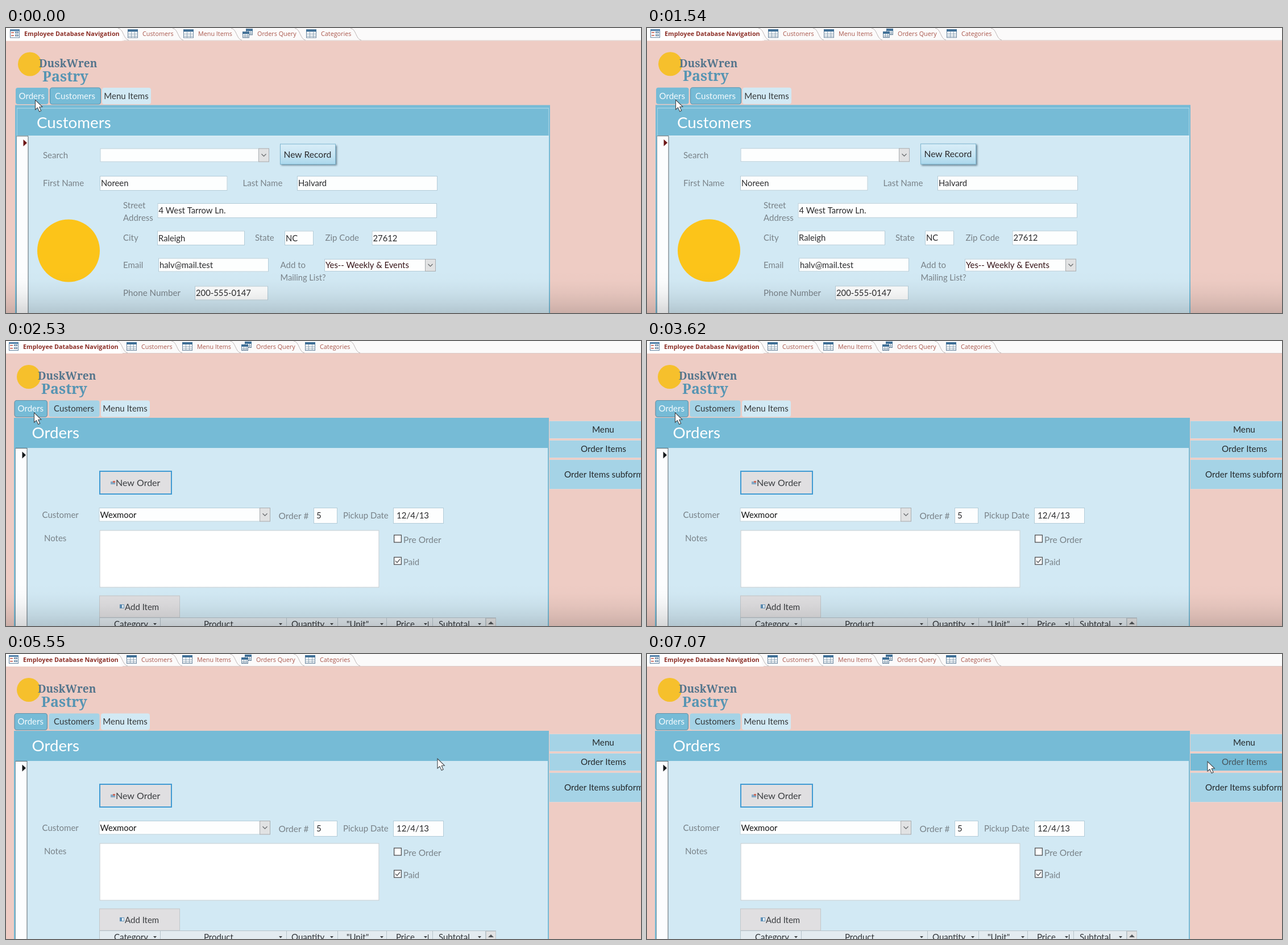
An HTML page with a canvas for the animation above (8 s loop, 1117 by 501 pixels).

```html
<!DOCTYPE html>
<html lang="en">
<head>
<meta charset="utf-8">
<title>Bakery database navigation</title>
<style>
html, body { margin: 0; width: 100%; height: 100%; overflow: hidden; background: #eeccc4; }
canvas { display: block; width: 1117px; height: 501px; }
</style>
</head>
<body>
<canvas id="stage" width="1117" height="501"></canvas>
<script>
const W = 1117, H = 501, LOOP = 8000;
const c = document.getElementById('stage').getContext('2d');
const FORM = 'Lato, "Open Sans", sans-serif';
const UI = '"Open Sans", "Noto Sans", sans-serif';
const SERIF = '"Noto Serif", serif';
const PINK = '#eeccc4', BLUE = '#76bbd6', SOFT = '#a5d3e6', PALE = '#d2e9f4';
const GREY = '#798288', INK = '#2a2a2c';

function rect(x, y, w, h, fill, stroke, lw = 1) {
  if (fill) { c.fillStyle = fill; c.fillRect(x, y, w, h); }
  if (stroke) {
    c.strokeStyle = stroke;
    c.lineWidth = lw;
    c.strokeRect(x + lw / 2, y + lw / 2, w - lw, h - lw);
  }
}

function path(points, fill, stroke, lw = 1, closed = true) {
  c.beginPath();
  points.forEach(([x, y], i) => i ? c.lineTo(x, y) : c.moveTo(x, y));
  if (closed) c.closePath();
  if (fill) { c.fillStyle = fill; c.fill(); }
  if (stroke) { c.strokeStyle = stroke; c.lineWidth = lw; c.stroke(); }
}

function disc(x, y, r, fill) {
  c.beginPath();
  c.arc(x, y, r, 0, Math.PI * 2);
  c.fillStyle = fill;
  c.fill();
}

// y is the middle of the capitals
function text(s, x, y, size = 15, fill = INK, family = FORM, weight = 400) {
  c.font = `${weight} ${size}px ${family}`;
  c.fillStyle = fill;
  c.fillText(s, x, y + size * 0.36);
}

const label = (s, x, y, size = 15) => text(s, x, y, size, GREY);

function field(x, y, w, h, value = '', fill = INK) {
  rect(x, y, w, h, '#fdfefe', '#b4ccd8');
  if (value) text(value, x + 2, y + h / 2, 14.8, fill);
}

function chevron(x, y) {
  path([[x - 4, y - 2], [x, y + 2], [x + 4, y - 2]], null, '#66696c', 1.2, false);
}

function combo(x, y, w, h, value, fill) {
  field(x, y, w, h, value, fill);
  rect(x + w - 19, y, 19, h, '#e1e2e3', '#a9adb0');
  chevron(x + w - 9.5, y + h / 2);
}

// Document tabs
function gridIcon(x, y, w = 18, h = 15) {
  rect(x, y, w, h, '#fff', '#64809a');
  rect(x, y, w, 4, '#3f6f96');
  for (let i = 1; i < 3; i++) {
    rect(x + i * w / 3, y + 4, 1, h - 4, '#8ba2b4');
    rect(x, y + 4 + i * (h - 4) / 3, w, 1, '#8ba2b4');
  }
}

function formIcon(x, y) {
  rect(x, y, 17, 15, '#fff', '#5f7f9c');
  rect(x, y, 17, 3, '#4f7fa8');
  for (const row of [5, 10]) {
    rect(x + 2, y + row, 5, 1.5, '#c0564a');
    rect(x + 9, y + row - 1, 6, 3, '#d5e5f1', '#5f7f9c');
  }
}

function queryIcon(x, y) {
  gridIcon(x + 6, y - 1, 12, 11);
  gridIcon(x, y + 4, 12, 11);
}

function docEdge(x) {
  c.beginPath();
  c.moveTo(x - 17, 0);
  c.bezierCurveTo(x - 7, 1, x - 8, 19, x + 2, 21);
  c.strokeStyle = '#bdb6b6';
  c.lineWidth = 1;
  c.stroke();
}

function docTabs() {
  rect(-4, -2, W + 8, 24, '#fbfafa');
  rect(-4, -2, 206, 24, '#fff');
  rect(205, 21, W, 1, '#dccbc8');
  formIcon(5, 2);
  text('Employee Database Navigation', 30, 10, 10.8, '#8c2f27', UI, 700);
  const tabs = [['Customers', 238, gridIcon], ['Menu Items', 336, gridIcon],
    ['Orders Query', 440, queryIcon], ['Categories', 552, gridIcon]];
  for (const [name, x, icon] of tabs) {
    icon(x - 26, 2);
    text(name, x, 10, 10.8, '#a9564b', UI);
  }
  [212, 308, 411, 523, 621].forEach(docEdge);
}

function brand() {
  disc(40, 63, 21, '#f6c02c');
  text('DuskWren', 56, 61.5, 19, '#54758c', SERIF, 600);
  text('Pastry', 62, 84, 25, '#5795b3', SERIF, 600);
}

function navTab(name, x, w, fill, ink, border) {
  c.beginPath();
  c.roundRect(x, 104.5, w, 29, 4);
  c.fillStyle = fill;
  c.fill();
  if (border) { c.strokeStyle = border; c.lineWidth = 1.2; c.stroke(); }
  c.textAlign = 'center';
  text(name, x + w / 2 - 0.5, 119, 15, ink);
  c.textAlign = 'left';
}

function navTabs(t) {
  const open = t >= 2530, hover = t >= 2220 && !open, focus = t >= 2450;
  navTab('Orders', 15, 57.5, hover ? '#9ecfe4' : BLUE, hover ? '#46535a' : '#f4fafd',
    focus ? '#6592a8' : null);
  navTab('Customers', 75.5, 89, open ? SOFT : BLUE, open ? '#34383a' : '#f4fafd',
    focus ? null : '#5797b3');
  navTab('Menu Items', 167, 86, PALE, '#34383a');
}

function panel(title, x, y, top, arrow) {
  rect(14, 135, 941, 370, BLUE);
  rect(17, top, 936, 320, PALE);
  rect(17, top, 20, 320, '#fcfdfe');
  rect(16, top, 1, 320, '#7f97a3');
  rect(36.5, top, 1, 320, '#59666d');
  rect(17, top, 20, 1, '#59666d');
  path([[28.5, top + 6.5], [35, top + 12.5], [28.5, top + 18.5]], arrow);
  text(title, x, y, 27.7, '#fff');
}

function customers(t) {
  panel('Customers', 52, 165.7, 189, t < 2220 ? '#6d1616' : '#380d0d');
  rect(17, 140, 936, 1, '#b9dfed');
  rect(17, 140, 1, 49, '#a4d3e5');
  rect(952, 140, 1, 49, '#a4d3e5');
  rect(37, 189, 916, 1, '#eaf5fa');

  label('Search', 63, 223);
  combo(163.5, 211, 297.5, 24, '');

  const glow = c.createLinearGradient(0, 203, 0, 240);
  glow.addColorStop(0, '#d9eef8');
  glow.addColorStop(0.5, '#c8e5f3');
  glow.addColorStop(1, '#a9d7ec');
  c.save();
  c.shadowColor = 'rgba(50,80,100,.65)';
  c.shadowBlur = 3;
  c.shadowOffsetX = c.shadowOffsetY = 2;
  rect(480, 203, 98, 36.5, glow);
  c.restore();
  rect(480, 203, 98, 36.5, null, '#7db5cf');
  text('New Record', 486.5, 221.5, 15.6);

  label('First Name', 63, 272);
  field(163, 259.5, 224.5, 26, 'Noreen');
  label('Last Name', 414.5, 272);
  field(510, 259.5, 247, 26, 'Halvard');
  label('Street', 204, 311);
  label('Address', 204, 333);
  field(264.5, 307.5, 491.5, 26, '4 West Tarrow Ln.');
  label('City', 204, 368.5);
  field(264, 356, 154, 25.5, 'Raleigh');
  label('State', 436, 368.5);
  field(488, 356, 51, 25.5, 'NC');
  label('Zip Code', 559.5, 368.5);
  field(641.5, 356, 114.5, 25.5, '27612');
  label('Email', 204, 416.5);
  field(266, 404, 194, 24, 'halv@mail.test');
  label('Add to', 480.5, 416.5);
  label('Mailing List?', 480.5, 438.5, 14.7);
  combo(558, 405.5, 196, 22, 'Yes-- Weekly & Events', '#351316');
  label('Phone Number', 204, 465, 15.2);
  field(330, 453, 129, 25, '200-555-0147');

  disc(108, 391, 55, '#fcc419');
}

function check(x, y, on) {
  rect(x, y, 14, 14, '#fff', '#4a4d50', 1.3);
  if (on) path([[x + 3, y + 7], [x + 6, y + 10], [x + 11, y + 4]], null, '#55585b', 1.4, false);
}

function sideTab(name, x, y, h, active) {
  rect(956, y - 1, 170, h + 2, '#e6d7d5');
  rect(956, y, 170, h, active ? BLUE : SOFT);
  text(name, x, y + h / 2, 15.2, active ? '#46545b' : '#25292b');
}

function itemTable() {
  rect(164, 486, 698, 20, '#e3ebf0');
  rect(164, 486, 698, 1, '#b6c3ca');
  const heads = [['Category', 190, 262], ['Product', 348, 483], ['Quantity', 502, 573],
    ['"Unit"', 599, 661], ['Price', 686, 738], ['Subtotal', 761, 833]];
  for (const [name, x, a] of heads) {
    text(name, x, 498, 15, '#303438');
    path([[a - 3, 496], [a + 3, 496], [a, 499.5]], '#3f4346');
  }
  rect(742, 493, 1.2, 8, '#3f4346');
  for (const x of [164, 271, 493, 583, 669, 750, 843]) rect(x, 486, 1, 16, '#b6c3ca');
  rect(844, 487, 18, 16, '#e2e3e4', '#c2c8cb');
  path([[848, 498], [853, 493], [858, 498]], '#55595c');
}

function orders(t) {
  panel('Orders', 45.5, 161.5, 188, '#16191b');
  sideTab('Menu', 1031, 141, 30);
  sideTab('Order Items', 1011, 175, 30, t >= 6640);
  sideTab('Order Items subform', 982, 209, 51);

  rect(164, 228, 128, 42, '#e0dfe1', '#419bd3', 2);
  rect(184, 247, 8, 5, '#85a9c5');
  rect(188, 246, 4, 3, '#cc6b5d');
  text('New Order', 193, 249.5, 16, '#3b3e41');

  label('Customer', 63.5, 306);
  combo(163.5, 293, 301.5, 24.5, 'Wexmoor', '#151515');
  label('Order #', 479.5, 307, 15.5);
  field(541, 293, 42, 28);
  text('5', 546, 307);
  label('Pickup Date', 593, 307);
  field(681, 293, 89, 28);
  text('12/4/13', 687, 307);
  label('Notes', 67, 346.5);
  rect(164.5, 332.5, 492, 101, '#fff', '#bac7ce');
  check(682, 340.5);
  label('Pre Order', 699, 349, 15.5);
  check(682, 379.5, true);
  label('Paid', 699, 388.5);

  rect(164, 447.5, 142, 39, '#e0dfe1', '#c3c7ca');
  rect(200, 463, 8, 7, '#eaf3fa', '#6f9cbe');
  rect(200, 463, 4, 7, '#5e90b7');
  text('Add Item', 209, 467.5, 15, '#3b3e41');
  itemTable();
}

// Motion: share of a move done, in n steps from t0 to t1
function steps(t, t0, t1, n) {
  if (t < t0) return 0;
  return Math.min(1, (Math.floor((t - t0) * (n - 1) / (t1 - t0) + 1e-6) + 1) / n);
}
const smooth = k => k * k * (3 - 2 * k);

function pointer(t) {
  const a = smooth(steps(t, 4850, 5550, 10));
  const b = smooth(steps(t, 5660, 6430, 11));
  const d = smooth(steps(t, 6500, 6850, 5));
  const e = t >= 7070 ? 1 : 0;
  return [49.5 + 709.5 * a + 180 * b + 45 * d + 2 * e, 126 + 58 * a + 3 * b + d + e];
}

function cursor(x, y) {
  const shape = [[0, 0], [0, 17], [4, 13.6], [7.2, 20.5], [10.2, 19], [7.2, 12.5], [12.4, 12]];
  path(shape.map(([a, b]) => [x + a, y + b]), '#fff', '#42474b', 1.1);
}

// The view slides two pixels left while the form settles
function drift(t) {
  return 2 - 0.5 * steps(t, 1210, 1300, 2) - 0.5 * steps(t, 1450, 1540, 2)
    - 0.5 * steps(t, 1850, 1990, 3) - 0.5 * steps(t, 2220, 2450, 4);
}

function shade(t) {
  const k = 0.15 * (1 - steps(t, 4000, 4070, 2));
  if (k <= 0) return;
  const g = c.createLinearGradient(0, 425, 0, H);
  for (let i = 0; i <= 4; i++) g.addColorStop(i / 4, `rgba(0,0,0,${k * (i / 4) ** 2})`);
  rect(0, 425, W, 76, g);
}

function draw(t) {
  rect(0, 0, W, H, PINK);
  c.save();
  const dx = drift(t);
  c.translate(dx, dx * 0.25);
  docTabs();
  brand();
  navTabs(t);
  (t < 2530 ? customers : orders)(t);
  cursor(...pointer(t));
  c.restore();
  shade(t);
}

const start = performance.now();
function tick() {
  draw((performance.now() - start) % LOOP);
  requestAnimationFrame(tick);
}
tick();
</script>
</body>
</html>
```
